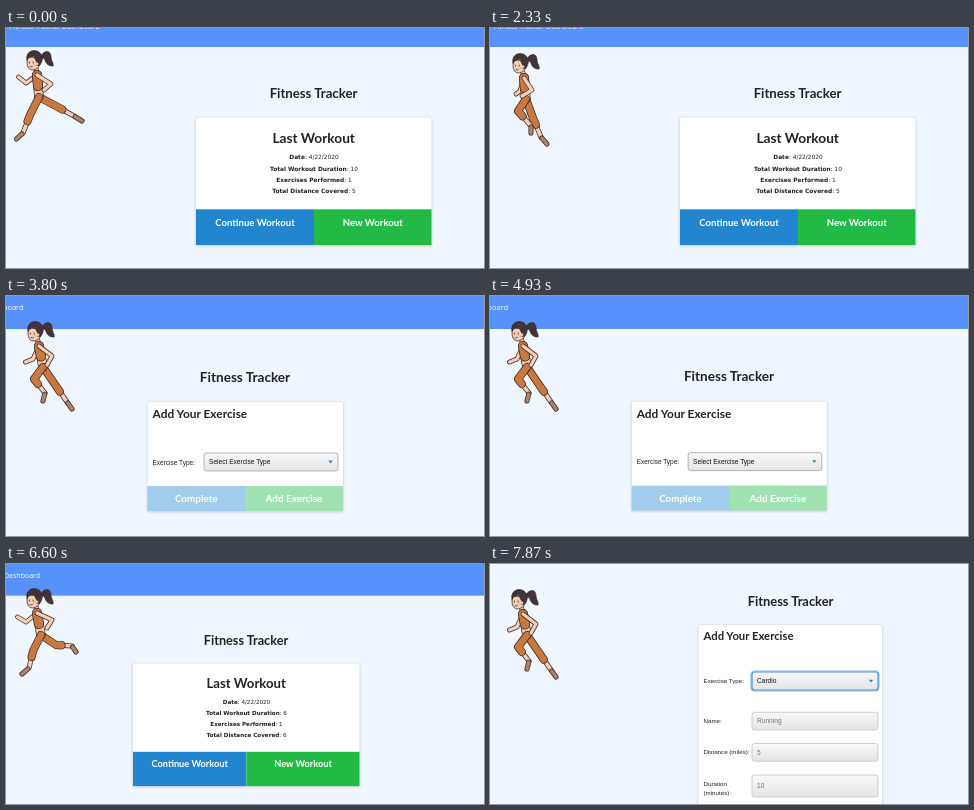
Recreate the animation shown at these times as an HTML page. Size 478 px wide and 240 px high, loop 8 s.

```html
<!DOCTYPE html>
<html lang="en">
<head>
<meta charset="utf-8">
<title>Fitness Tracker</title>
<style>
html, body { margin: 0; width: 100%; height: 100%; overflow: hidden; background: #eff6fe; }
svg { display: block; width: 478px; height: 240px; }
.lato { font-family: Lato, sans-serif; font-weight: 700; }
.ui { font-family: "Liberation Sans", Arial, sans-serif; }
.info { font: 5.85px "DejaVu Sans", Verdana, sans-serif; }
.nav { font: 7.3px "Open Sans", sans-serif; }
</style>
</head>
<body>
<svg id="stage" viewBox="0 0 478 240" xmlns="http://www.w3.org/2000/svg"></svg>
<script>
const LOOP = 8000;
const INK = '#3d2b2b', SKIN = '#f5cfb3', CLOTH = '#c9783f', HAIR = '#40333a', SHOE = '#a98468';

// page helpers
const rect = (x, y, w, h, fill, more = '') =>
  `<rect x="${x}" y="${y}" width="${w}" height="${h}" fill="${fill}" ${more}/>`;

const text = (cls, x, y, str, size, fill = '#222', anchor = 'start') =>
  `<text class="${cls}" x="${x}" y="${y}" fill="${fill}" text-anchor="${anchor}"` +
  `${size ? ` font-size="${size}"` : ''}>${str}</text>`;

const title = (x, y, size) => text('lato', x, y, 'Fitness Tracker', size, '#222', 'middle');

const card = (x, y, w, h) =>
  rect(x - .5, y, w + 1, h + 1.2, '#c9ced5', 'rx="2" filter="url(#soft)"') +
  rect(x, y, w, h, '#fff', 'rx="1.5"');

const button = (x, y, w, h, fill, label, base, size, alpha = 1) =>
  `<g opacity="${alpha}">${rect(x, y, w, h, fill)}</g>` +
  text('lato', x + w / 2, base, label, size, '#fff', 'middle');

const field = (x, y, w, h, value, color, edge = '#c3c3c3', line = .8) =>
  rect(x, y, w, h, 'url(#field)', `rx="2.5" stroke="${edge}" stroke-width="${line}"`) +
  text('ui', x + 5, y + h / 2 + 2.3, value, 6.6, color);

const arrow = (x, y) => `<path d="M${x - 2.3} ${y - 1.2}h4.6l-2.3 2.8z" fill="#3d87ad"/>`;

function summary(duration, distance) {
  const rows = [['Date', '4/22/2020'], ['Total Workout Duration', duration],
    ['Exercises Performed', 1], ['Total Distance Covered', distance]];
  const info = rows.map(([k, v], i) =>
    text('info', 308, 131.2 + i * 11.4, `<tspan font-weight="700">${k}</tspan>: ${v}`, 0, '#222', 'middle'));
  return title(307.5, 69.8, 13.2) + card(190, 89.5, 235.5, 127.5) +
    text('lato', 307.7, 115, 'Last Workout', 13.7, '#222', 'middle') + info.join('') +
    button(190, 181.3, 118, 35.7, '#2185d0', 'Continue Workout', 197.6, 9.6) +
    button(308, 181.3, 117.5, 35.7, '#21ba45', 'New Workout', 197.6, 9.6);
}

function blankForm() {
  return title(239, 85.5, 13.6) + card(141.5, 106, 195.5, 109) +
    text('lato', 146.5, 122.3, 'Add Your Exercise', 11.9) +
    text('ui', 146.5, 168.8, 'Exercise Type:', 6.5) +
    field(198, 157, 134, 18, 'Select Exercise Type', '#111', '#a5a5a5') + arrow(324.5, 165.8) +
    button(141.5, 190, 97.5, 25, '#2185d0', 'Complete', 206.2, 9.9, .42) +
    button(239, 190, 98, 25, '#21ba45', 'Add Exercise', 206.2, 9.9, .42);
}

function filledForm() {
  const label = (y, str) => text('ui', 213.5, y, str, 6.2);
  return rect(0, 0, 478, 240, '#eff6fe') + title(300.5, 41.6, 12.9) + card(208.5, 61, 183.5, 200) +
    text('lato', 213.5, 76.2, 'Add Your Exercise', 11.3) +
    label(119.2, 'Exercise Type:') +
    rect(261, 107, 128, 20, 'none', 'rx="3.5" stroke="#a9cdf5" stroke-width="1.6"') +
    field(262, 108, 126, 18, 'Cardio', '#111', '#4f92dc', 1.2) + arrow(381, 117) +
    label(159.4, 'Name:') + field(262, 148.3, 126, 17.7, 'Running', '#777') +
    label(190.4, 'Distance (miles):') + field(262, 179.5, 126, 17.7, '5', '#777') +
    label(221.6, 'Duration') + label(230.6, '(minutes):') + field(262, 211, 126, 22, '10', '#777');
}

// runner
const mix = (a, b, k) => [a[0] + (b[0] - a[0]) * k, a[1] + (b[1] - a[1]) * k];

function limb(pts, w, color) {
  const d = 'M' + pts.map(p => p.join(' ')).join('L');
  return `<path d="${d}" stroke="${INK}" stroke-width="${w + 1.5}"/><path d="${d}" stroke="${color}" stroke-width="${w}"/>`;
}

const arm = (sh, [elbow, hand]) => limb([sh, elbow, hand], 3.3, SKIN);

const leg = (hip, [knee, ankle, toe]) =>
  limb([knee, ankle], 3.6, SKIN) +
  limb([mix(ankle, toe, .15), toe], 3.6, SHOE) +
  limb([hip, knee, mix(knee, ankle, .35)], 6.6, CLOTH);

const head = ([x, y]) => `<g transform="translate(${x} ${y})" stroke="${INK}" stroke-width=".8">
  <path d="M6-5C9-11 16-11 16-4C16 0 19 2 18 5C14 5 11 3 10-1C9-3 8-3 6-3Z" fill="${HAIR}"/>
  <path d="M-7-4C-9 2-8 8-3 9C2 9 6 5 6-2Z" fill="${SKIN}"/>
  <path d="M-8-1C-10-10 0-13 5-8C9-4 7 2 4 5L2 1C0-1 0-3-1-5C-4-4-6-4-8-1Z" fill="${HAIR}"/>
  <path d="M2 1a1.8 1.8 0 1 1 0 3.6" fill="${SKIN}"/>
  <path d="M-5.6 1v1.2M-1.8 1v1.2M-5 5.6q1.4 1 2.4 0" fill="none"/>
  <path d="M-1 4h1.6" stroke="#ec9c8b"/></g>`;

const runner = p =>
  arm(p.sh, p.far) + leg(p.hip, p.back) +
  limb([mix(p.sh, p.head, .45), p.sh], 3.4, SKIN) +
  limb([p.sh, p.hip], 8, SKIN) + limb([p.sh, mix(p.sh, p.hip, .5)], 8.6, CLOTH) +
  leg(p.hip, p.front) + arm(p.sh, p.near) + head(p.head);

const poses = [
  { head: [29, 33], sh: [31, 47], hip: [33, 69],
    far: [[20, 55], [12.5, 49]], near: [[45, 56], [38, 62]],
    back: [[50, 78], [68, 88], [76, 93]], front: [[24, 87], [17, 105], [10.5, 111]] },
  { head: [31, 36], sh: [34, 50], hip: [36, 71],
    far: [[30, 63], [26, 66]], near: [[42, 62], [32, 68]],
    back: [[43, 90], [51, 109], [57, 116]], front: [[28, 83], [41, 98], [41, 105]] },
  { head: [29, 35], sh: [31, 49], hip: [35, 71],
    far: [[20, 58], [11.5, 53]], near: [[46, 56], [41, 64]],
    back: [[50, 81], [66, 82], [70, 88]], front: [[27, 87], [23, 104], [16, 110]] },
  { head: [30, 36], sh: [33, 50], hip: [37, 71],
    far: [[27, 63], [19.5, 66]], near: [[46, 60], [41, 69]],
    back: [[50, 90], [61, 106], [66, 113]], front: [[28, 83], [39, 97], [37, 105]] }
];

const stage = document.getElementById('stage');
const pages = [
  summary(10, 5),
  `<g transform="scale(${1 / 1.034}) translate(79 -13.4)">${blankForm()}</g>`,
  summary(6, 6)
];
stage.innerHTML = `<defs>
  <linearGradient id="field" x2="0" y2="1"><stop stop-color="#f9f9f9"/><stop offset="1" stop-color="#e4e4e4"/></linearGradient>
  <filter id="soft" x="-5%" y="-5%" width="110%" height="110%"><feGaussianBlur stdDeviation=".9"/></filter></defs>
  ${rect(0, 0, 478, 240, '#eff6fe')}
  <g id="camera">${rect(-200, -200, 1000, 219, '#5691fc')}
  ${text('nav', 93.5, .6, 'Fitness Tracker Dashboard', 0, '#fff', 'end')}
  ${pages.map(p => `<g class="page">${p}</g>`).join('')}</g>
  <g class="page">${filledForm()}</g>
  <g fill="none" stroke-linecap="round" stroke-linejoin="round">
  ${poses.map(p => `<g class="pose">${runner(p)}</g>`).join('')}</g>`;

const camera = document.getElementById('camera');
const show = (cls, n) => stage.querySelectorAll(cls).forEach((g, i) => {
  g.style.display = i === n ? '' : 'none';
});

// camera views: scale, x, y
const views = [[1, 0, 0], [1.034, -79, 13.4], [.962, -55.8, 13.4]];
const ease = (t, from, to) => {
  const k = Math.min(1, Math.max(0, (t - from) / (to - from)));
  return k * k * (3 - 2 * k);
};

function poseAt(t) {
  const p = t % 1000;
  if (t < 50) return 0;
  return p < 50 || p >= 795 ? 3 : p < 300 ? 0 : p < 560 ? 1 : 2;
}

function draw(t) {
  const a = ease(t, 2500, 3070), b = ease(t, 4840, 5670);
  const [k, x, y] = views[0].map((v, i) =>
    v + (views[1][i] - v) * a + (views[2][i] - views[1][i]) * b);
  camera.setAttribute('transform', `translate(${x} ${y}) scale(${k})`);
  show('.page', t < 2530 ? 0 : t < 5400 ? 1 : t < 7520 ? 2 : 3);
  show('.pose', poseAt(t));
}

const start = performance.now();
function tick() {
  draw((performance.now() - start) % LOOP);
  requestAnimationFrame(tick);
}
draw(0);
tick();
</script>
</body>
</html>
```
